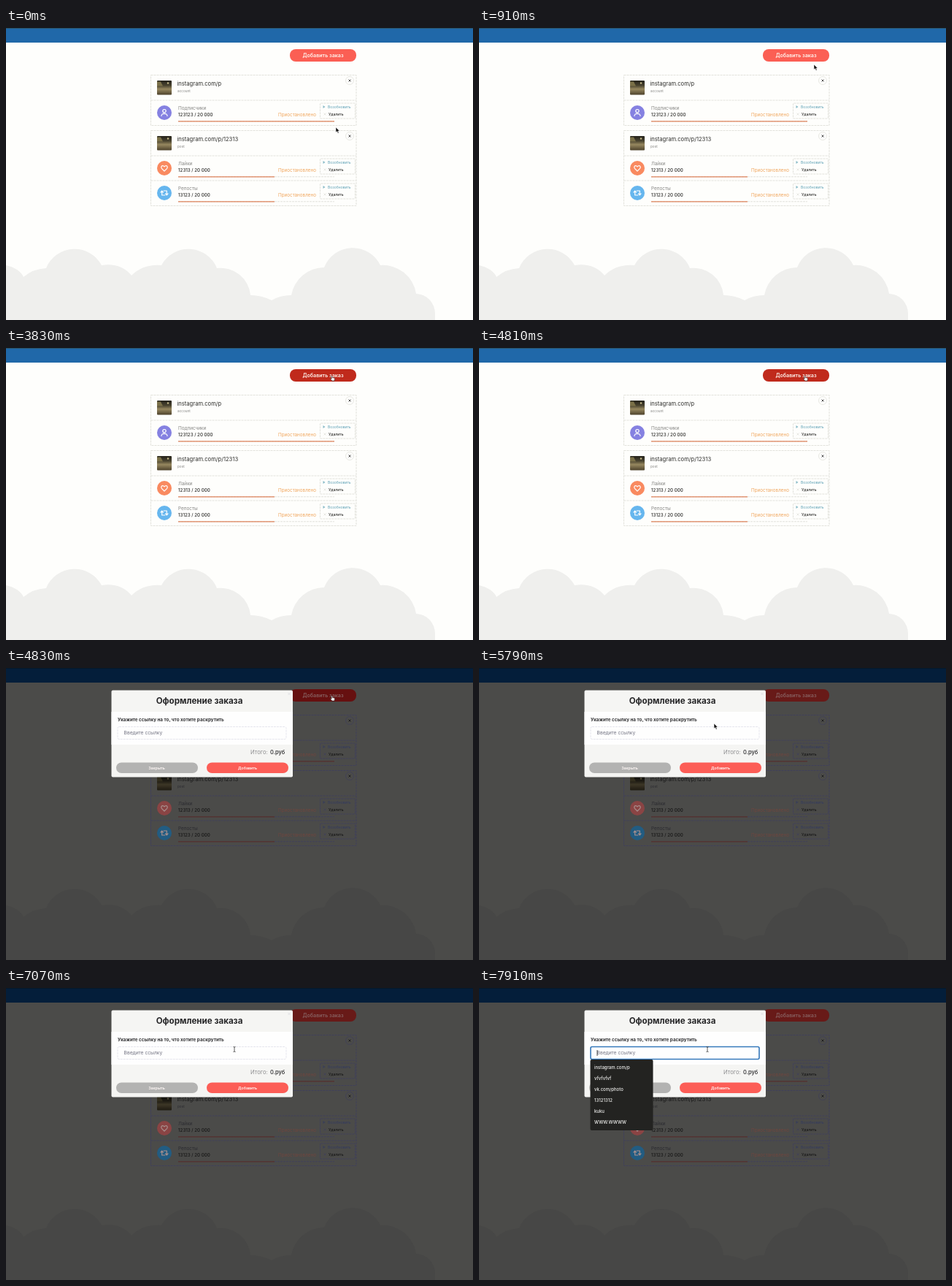
These frames come from a looping animation (640x400 px, 8000 ms). An HTML page:

```html
<!DOCTYPE html>
<html lang="ru">
<head>
<meta charset="utf-8">
<title>Заказы</title>
<style>
html, body { margin: 0; width: 100%; height: 100%; overflow: hidden; }
svg {
  display: block; width: 100vw; height: 100vh;
  font-family: Inter, "Open Sans", sans-serif;
  --page: #fefefc; --cloud: #efefed; --bar: #2068a9; --barTop: #29566f;
  --add: #fb5f54; --addText: #fff6f0; --line: #e2e2dc; --ink: #2e2e2c;
  --soft: #868684; --wait: #f0a55c; --resume: #5a9fb4; --progress: #df845c;
  --user: #8581e1; --heart: #f98a60; --share: #66b6ee; --mark: #fff; --photo: 1;
}
svg.hot { --add: #c02a1c; }
svg.dim {
  --page: #4b4b49; --cloud: #474746; --bar: #041e3a; --barTop: #06182a;
  --add: #681a18; --addText: #866060; --line: #40405a; --ink: #171717;
  --soft: #2b2b30; --wait: #70463e; --resume: #323a60; --progress: #56302a;
  --user: #2c2b58; --heart: #8a4444; --share: #225c82; --mark: #a8908e; --photo: .4;
}
svg.dim.hot { --add: #661010; }
.page { fill: var(--page); }
.ink { fill: var(--ink); }
.soft { fill: var(--soft); }
.line { fill: none; stroke: var(--line); stroke-dasharray: 3 1; }
.mark { fill: none; stroke: var(--mark); stroke-width: 1.2; stroke-linecap: round; stroke-linejoin: round; }
.photo { filter: brightness(var(--photo)); }
.tiny { font-size: 5px; }
.mid { text-anchor: middle; }
</style>
</head>
<body>
<svg id="stage" viewBox="0 0 640 400" preserveAspectRatio="none">
  <defs>
    <linearGradient id="photo" x2="0" y2="1">
      <stop offset="0" stop-color="#24221a"/>
      <stop offset=".35" stop-color="#4a4430"/>
      <stop offset=".6" stop-color="#97885f"/>
      <stop offset="1" stop-color="#4d422c"/>
    </linearGradient>
  </defs>
  <rect class="page" width="640" height="400"/>
  <path fill="var(--cloud)" d="M0 325Q18 329 24 341Q37 330 55 329A42 42 0 0 1 131 325Q157 321 172 339Q188 323 213 325A42 42 0 0 1 289 329A41 41 0 0 1 335 366Q350 366 364 373Q376 366 391 366A46 46 0 0 1 436 328A42 42 0 0 1 513 325A46 46 0 0 1 562 364A27 27 0 0 1 588 391V400H0Z"/>
  <rect width="640" height="20" fill="var(--bar)"/>
  <rect width="640" height="1" fill="var(--barTop)"/>
  <rect x="389" y="29" width="91" height="17" rx="8" fill="var(--add)"/>
  <text class="mid" x="434.5" y="40" font-size="7.1" font-weight="600" fill="var(--addText)">Добавить заказ</text>
  <g id="cards"></g>

  <g id="modal">
    <rect x="144.5" y="30.5" width="248.5" height="119" rx="2" fill="#f5f5f3"/>
    <rect x="144.5" y="60" width="248.5" height="45" fill="#fefefe"/>
    <path d="M386.5 34l3 3m0-3l-3 3" stroke="#dcdce0" stroke-width=".7"/>
    <text class="mid" x="265" y="49.2" font-size="11.6" font-weight="700" fill="#272729">Оформление заказа</text>
    <text x="153" y="72.5" font-size="6.3" font-weight="700" fill="#333335">Укажите ссылку на то, что хотите раскрутить</text>
    <rect x="153" y="80.5" width="231" height="17" rx="2" fill="#fefefe" stroke="#e6e6ee" stroke-dasharray="3 1"/>
    <text x="161.5" y="91" font-size="6.7" fill="#727382">Введите ссылку</text>
    <text x="335" y="118.3" font-size="7.6" fill="#8e8e90">Итого:</text>
    <text x="362" y="118.3" font-size="7.5" font-weight="500" fill="#272729">0.руб</text>
    <rect x="151" y="129.5" width="112" height="14.5" rx="7.2" fill="#b3b3b2"/>
    <rect x="275" y="129.5" width="112" height="14.5" rx="7.2" fill="#fc5d56"/>
    <g class="mid" font-size="5.3" font-weight="600" fill="#fff8f6">
      <text x="206.5" y="138.5">Закрыть</text>
      <text x="331" y="138.5">Добавить</text>
    </g>
  </g>

  <g id="focus">
    <rect x="153" y="80.5" width="231" height="17" rx="2" fill="none" stroke="#3679bb" stroke-width="1.6"/>
    <path d="M162 85v8" stroke="#222" stroke-width=".8"/>
    <rect x="152.5" y="98" width="86" height="97" rx="2" fill="#232321"/>
    <g id="hints" font-size="6" font-weight="500" fill="#f3f3f1"></g>
  </g>

  <g id="arrow"><path d="M0 0V7L1.7 5.5L2.9 8.2L4.1 7.6L3 5.1H5.1Z" fill="#111" stroke="#fff" stroke-width=".5"/></g>
  <g id="hand"><path d="M-1.2-2.5Q-.5-3.3 .1-2.3L.6-.4L2.6 0Q3.7 .4 3.5 1.6L3 4H-.3L-2.2 1.3Q-2.2 .2-.7 1Z" fill="#fff" stroke="#222" stroke-width=".6"/></g>
  <g id="beam"><path d="M-1.5-3.5Q0-3.5 0-2.5Q0-3.5 1.5-3.5M0-2.5V2.5M-1.5 3.5Q0 3.5 0 2.5Q0 3.5 1.5 3.5" fill="none" stroke="#333" stroke-width=".8"/></g>
</svg>
<script>
const $ = id => document.getElementById(id);
const LOOP = 8000, HOVER = 3600, OPEN = 4830, LEAVE = 5000, INPUT = 6850, FOCUS = 7200;

const glyphs = {
  user: '<circle cy="-2.3" r="2.2"/><path d="M-4 4.5Q-4 1.3 0 1.3Q4 1.3 4 4.5"/>',
  heart: '<path d="M0 4L-3.7 .3Q-5-1.5-3.5-3Q-1.7-4.3 0-2Q1.7-4.3 3.5-3Q5-1.5 3.7 .3Z"/>',
  share: '<path d="M-5-.8L-3.3-3L-1.6-.8M-3.3-2.5V3H1M5 .8L3.3 3L1.6 .8M3.3 2.5V-3H-1"/>'
};

function cardHead(y, height, title, kind) {
  return `<rect class="line" x="198.5" y="${y}" width="281.5" height="${height}"/>
    <g class="photo">
      <rect x="207" y="${y + 7.5}" width="20" height="19.5" rx="1" fill="url(#photo)"/>
      <path d="M207 ${y + 9}h5l3 6h-8z" fill="#7a7048"/><circle cx="222" cy="${y + 11}" r="1.2" fill="#c5b988"/>
    </g>
    <text class="ink" x="234.5" y="${y + 14}" font-size="7.6">${title}</text>
    <text class="soft" x="235" y="${y + 23.5}" font-size="4.7">${kind}</text>
    <circle class="page" cx="471" cy="${y + 7.5}" r="5.5" stroke="var(--line)" stroke-width=".8"/>
    <path d="M469.5 ${y + 6}l3 3m0-3l-3 3" stroke="var(--ink)" stroke-width=".8"/>`;
}

function orderRow(y, icon, name, count, end) {
  return `<path class="line" d="M198.5 ${y}H480"/>
    <circle cx="217" cy="${y + 17}" r="10" fill="var(--${icon})"/>
    <g class="mark" transform="translate(217 ${y + 17})">${glyphs[icon]}</g>
    <text class="soft" x="236" y="${y + 12.5}" font-size="6.4">${name}</text>
    <text class="ink" x="236" y="${y + 22}" font-size="6.2" font-weight="500">${count} / 20 000</text>
    <text x="373" y="${y + 22}" font-size="6.3" fill="var(--wait)">Приостановлено</text>
    <path class="line" d="M236 ${y + 28.8}H450"/>
    <path d="M236 ${y + 28.8}H${end}" stroke="var(--progress)" stroke-width="1.3"/>
    <rect class="line" x="430.5" y="${y + 4}" width="48" height="21" rx="1"/>
    <path d="M434.5 ${y + 7}l3 2l-3 2z" fill="var(--resume)" opacity=".7"/>
    <text class="tiny" x="441" y="${y + 11}" fill="var(--resume)">Возобновить</text>
    <path d="M435.5 ${y + 17.5}l3 3m0-3l-3 3" stroke="var(--line)" stroke-width=".8"/>
    <text class="tiny ink" x="442" y="${y + 21}" font-weight="500">Удалить</text>`;
}

$('cards').innerHTML =
  cardHead(64.5, 69, 'instagram.com/p', 'account') +
  orderRow(99, 'user', 'Подписчики', '123123', 450) +
  cardHead(140.5, 103, 'instagram.com/p/12313', 'post') +
  orderRow(175, 'heart', 'Лайки', '12313', 368) +
  orderRow(209, 'share', 'Репосты', '13123', 368);

$('hints').innerHTML = ['instagram.com/p', 'vfvfvfvf', 'vk.com/photo', '13121312', 'kuku', 'WWW.WWWW']
  .map((text, i) => `<text x="158" y="${111 + i * 15}">${text}</text>`).join('');

// Pointer stops: time, x, y
const stops = [
  [0, 452, 136], [100, 452, 136], [550, 466, 46], [800, 459, 50], [1000, 459, 50],
  [1400, 454, 41], [3300, 454, 41], [3800, 447, 41], [LEAVE, 447, 41],
  [5800, 322, 76], [6500, 316.5, 79.5], [6750, 316.5, 79.5], [7050, 313, 84], [LOOP, 313, 84]
];

function pointerAt(t) {
  const i = stops.findIndex(stop => stop[0] > t);
  const [t0, x0, y0] = stops[i - 1], [t1, x1, y1] = stops[i];
  const k = (t - t0) / (t1 - t0), ease = k * k * (3 - 2 * k);
  return [x0 + (x1 - x0) * ease, y0 + (y1 - y0) * ease];
}

const show = (id, on) => $(id).style.display = on ? '' : 'none';

function draw(now) {
  const t = now % LOOP;
  $('stage').classList.toggle('dim', t >= OPEN);
  $('stage').classList.toggle('hot', t >= HOVER && t < LEAVE);
  show('modal', t >= OPEN);
  show('focus', t >= FOCUS);

  const cursor = t >= INPUT ? 'beam' : t >= HOVER && t < LEAVE ? 'hand' : 'arrow';
  const [x, y] = pointerAt(t);
  for (const id of ['arrow', 'hand', 'beam']) show(id, id === cursor);
  $(cursor).setAttribute('transform', `translate(${x} ${y})`);
  requestAnimationFrame(draw);
}
draw(0);
</script>
</body>
</html>
```
